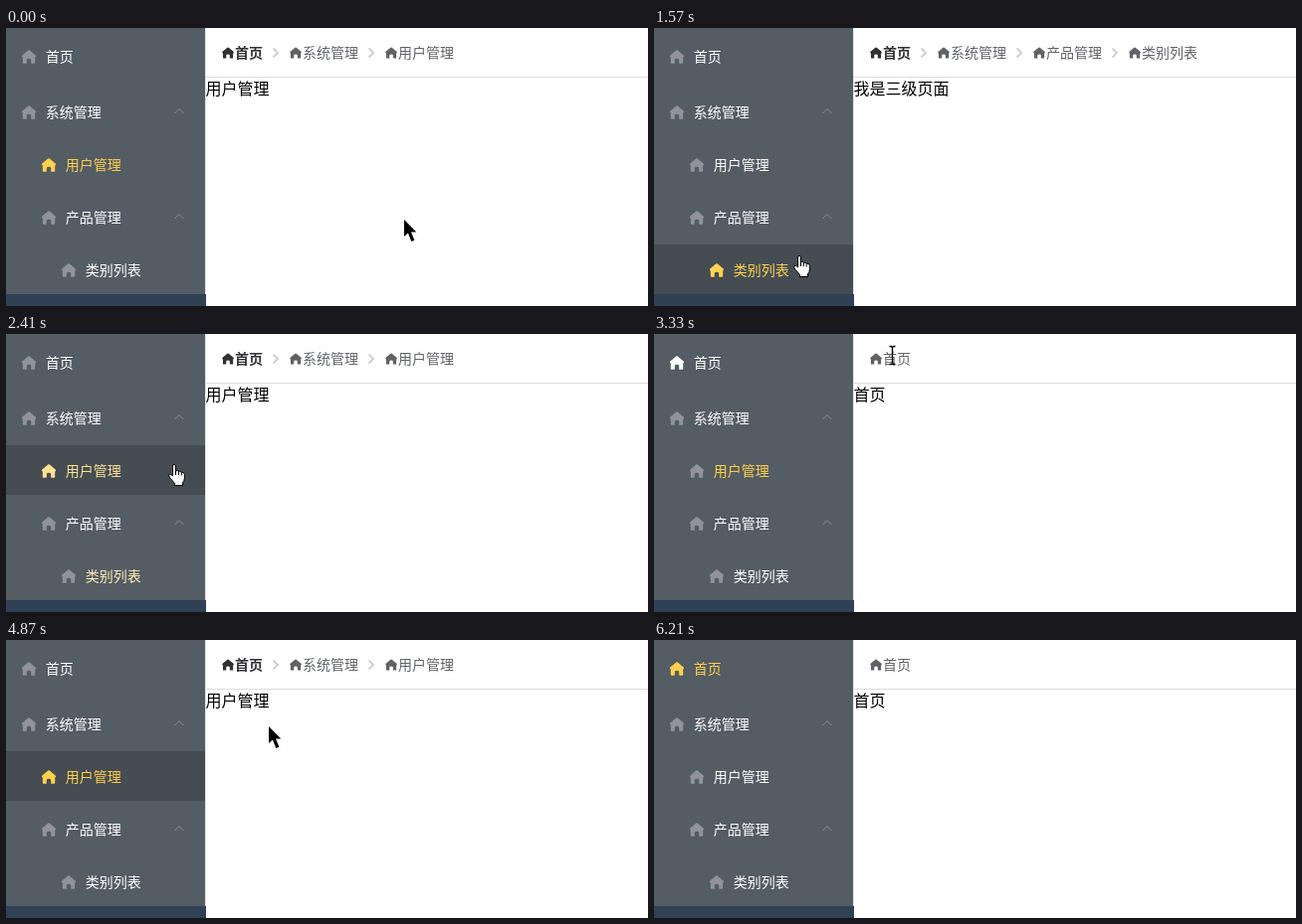
Recreate the animation shown at these times as an HTML page. Size 645x280 px, loop 6830 ms.

```html
<!DOCTYPE html>
<html lang="zh-CN">
<head>
<meta charset="utf-8">
<title>菜单与面包屑</title>
<style>
  html, body { margin: 0; width: 100%; height: 100%; overflow: hidden; background: #fff; }
  svg { display: block; width: 645px; height: 280px; }
  text { font: 14px "Noto Sans CJK SC", "Noto Sans CJK", "Noto Sans", sans-serif; }
</style>
</head>
<body>
<svg id="stage" viewBox="0 0 645 280">
  <defs>
    <path id="house" d="M7 0Q7.4 0 7.8 .3L13.7 5.2Q14.3 5.8 14 6.7L13.2 7.4V12.8Q13.2 13.6 12.4 13.6H9.2V10Q9.2 8.6 7 8.6T4.8 10V13.6H1.6Q.8 13.6 .8 12.8V7.4L0 6.7Q-.3 5.8 .3 5.2L6.2 .3Q6.6 0 7 0Z"/>
  </defs>
  <rect width="645" height="280" fill="#fff"/>
  <rect y="268" width="201" height="12" fill="#304156"/>
  <rect width="200" height="268" fill="#545c64"/>
  <rect x="200" width="1" height="268" fill="#e6e6e6"/>
  <rect x="201" y="49" width="444" height="1" fill="#dcdcdc"/>
  <g id="menu"></g>
  <g id="crumbs"></g>
  <text id="title" x="200.6" y="67" style="font-size:16px" fill="#000"></text>
  <g id="cursor"></g>
</svg>
<script>
const LOOP = 6830, FADE = 250;
const WHITE = [255, 255, 255], YELLOW = [255, 208, 75];
const DARK = [48, 49, 51], BLUE = [64, 158, 255], GREY = '#909399';

// label, top, height, indent, has submenu
const rows = [
  ['首页', 0, 56, 16, false],
  ['系统管理', 56, 56, 16, true],
  ['用户管理', 112, 50, 36, false],
  ['产品管理', 162, 56, 36, true],
  ['类别列表', 218, 50, 56, false]
];

const pages = {
  home: { row: 0, title: '首页', trail: ['首页'] },
  users: { row: 2, title: '用户管理', trail: ['首页', '系统管理', '用户管理'] },
  types: { row: 4, title: '我是三级页面', trail: ['首页', '系统管理', '产品管理', '类别列表'] }
};

const visits = [
  [-1000, 'users'], [1330, 'types'], [2260, 'users'],
  [3330, 'home'], [4580, 'users'], [5540, 'home']
];

// row (or link), fade in from/to, fade out from/to
const hovers = [
  [4, 790, 1180, 1690, 1840],
  [3, 1690, 1840, 1840, 2200],
  [2, 1880, 2260, 2410, 2680],
  [2, 4000, 4150, 4870, 5000],
  ['link', 2700, 2940, 3210, 3330],
  ['link', 5000, 5260, 5400, 5540]
];

// Screen captures of the pointer: time, shape, x, y
const steps = [
  [0, 'arrow', 400, 193], [400, 'arrow', 411, 196], [550, 'arrow', 398, 192],
  [670, 'arrow', 340, 189], [790, 'arrow', 252, 204], [910, 'hand', 172, 222],
  [1030, 'hand', 140, 227], [1180, 'hand', 140, 228], [1330, 'hand', 140, 229],
  [1450, 'hand', 140, 229], [1570, 'hand', 140, 229], [1690, 'hand', 138, 222],
  [1840, 'hand', 123, 156], [1990, 'hand', 142, 139], [2110, 'hand', 149, 131],
  [2260, 'hand', 149, 131], [2410, 'hand', 163, 131], [2560, 'arrow', 262, 88],
  [2680, 'arrow', 247, 42], [2820, 'hand', 236, 25], [2940, 'hand', 233, 22],
  [3330, 'beam', 236, 12], [3450, 'beam', 236, 12], [3570, 'beam', 234, 13],
  [3690, 'beam', 225, 16], [3850, 'hand', 157, 65], [4000, 'hand', 116, 122],
  [4150, 'hand', 107, 136], [4580, 'hand', 107, 136], [4730, 'hand', 123, 134],
  [4870, 'arrow', 264, 87], [5000, 'arrow', 265, 31], [5140, 'hand', 238, 25],
  [5260, 'hand', 233, 23], [5540, 'beam', 236, 13], [5670, 'beam', 237, 14],
  [5790, 'arrow', 260, 72], [5940, 'arrow', 330, 192], [6090, 'arrow', 459, 247],
  [6210, 'none', 0, 0]
];

const shapes = {
  none: '',
  arrow: '<path d="M0 0V17L3.9 13.4L7.3 22L10.4 20.8L7 12.6H12.3Z"/>',
  beam: '<path d="M.5 .5H2.5L3.5 1.5L4.5 .5H6.5M3.5 1.5V17.5M.5 18.5H2.5L3.5 17.5L4.5 18.5H6.5" fill="none" stroke="#000" stroke-width="1.4"/>',
  hand: '<path d="M4.5 2A1.5 1.5 0 0 1 7.5 2V6.8Q9.4 5.9 10.3 7.4Q12.2 6.7 13 8.2Q16.3 7.8 16.4 10.6V14Q16.3 16.8 14.5 18.6V21.5H6.5V19.4L2.2 14.4Q.2 11.8 .7 10.8Q2.2 9.2 4.5 12Z" fill="#fff" stroke="#000"/>' +
    '<path d="M7.5 6.5V11M10.4 7.5V11M13.2 8.5V11.5" stroke="#000"/>'
};

const el = id => document.getElementById(id);
const clamp = v => Math.min(1, Math.max(0, v));
const ramp = (t, a, b) => a === b ? +(t >= a) : clamp((t - a) / (b - a));
const mix = (a, b, p) => `rgb(${a.map((v, i) => Math.round(v + (b[i] - v) * p))})`;
const latest = (list, t) => list.reduce((k, item, i) => item[0] <= t ? i : k, 0);
const house = (x, y, scale, fill) =>
  `<use href="#house" transform="translate(${x} ${y}) scale(${scale})" fill="${fill}"/>`;
const label = (x, y, fill, text, weight = 500) =>
  `<text x="${x}" y="${y}" fill="${fill}" style="font-weight:${weight}">${text}</text>`;

function hoverOf(key, t) {
  return Math.max(0, ...hovers.filter(h => h[0] === key)
    .map(([, a, b, c, d]) => ramp(t, a, b) - ramp(t, c, d)));
}

function drawMenu(t, active, last, fade) {
  return rows.map(([name, top, height, x, sub], i) => {
    const mid = top + height / 2;
    const glow = i === active ? fade : i === last ? 1 - fade : 0;
    const color = mix(WHITE, YELLOW, glow);
    const hover = hoverOf(i, t);
    let out = hover ? `<rect y="${top}" width="200" height="${height}" fill="#454c52" opacity="${hover}"/>` : '';
    out += house(x, mid - 5.8, 1, i === active ? color : GREY);
    out += label(x + 23.7, mid + 6, color, name);
    if (sub) out += `<path d="M169.5 ${mid + 2}l4.5 -4.5l4.5 4.5" fill="none" stroke="#84929f"/>`;
    return out;
  }).join('');
}

function drawCrumbs(t, trail) {
  let x = 217;
  return trail.map((name, i) => {
    const link = i === 0 && trail.length > 1;
    const color = link ? mix(DARK, BLUE, hoverOf('link', t)) : '#606266';
    let out = house(x + .3, 19.4, .82, color) + label(x + 13, 30, color, name, link ? 700 : 500);
    x += 13 + name.length * 14;
    if (i < trail.length - 1)
      out += `<path d="M${x + 10.5} 20.5l4.5 4.5l-4.5 4.5" fill="none" stroke="#c0c4cc" stroke-width="1.5"/>`;
    x += 27;
    return out;
  }).join('');
}

let shown = -1;

function draw(now) {
  const k = latest(steps, now % LOOP);
  if (k === shown) return;
  shown = k;
  const [t, shape, x, y] = steps[k];
  const v = latest(visits, t);
  const page = pages[visits[v][1]];
  const last = v ? pages[visits[v - 1][1]].row : -1;
  el('menu').innerHTML = drawMenu(t, page.row, last, clamp((t - visits[v][0]) / FADE));
  el('crumbs').innerHTML = drawCrumbs(t, page.trail);
  el('title').textContent = page.title;
  el('cursor').innerHTML = shapes[shape];
  el('cursor').setAttribute('transform', `translate(${x} ${y})`);
}

const start = performance.now();
function tick() {
  draw(performance.now() - start);
  requestAnimationFrame(tick);
}
tick();
</script>
</body>
</html>
```
